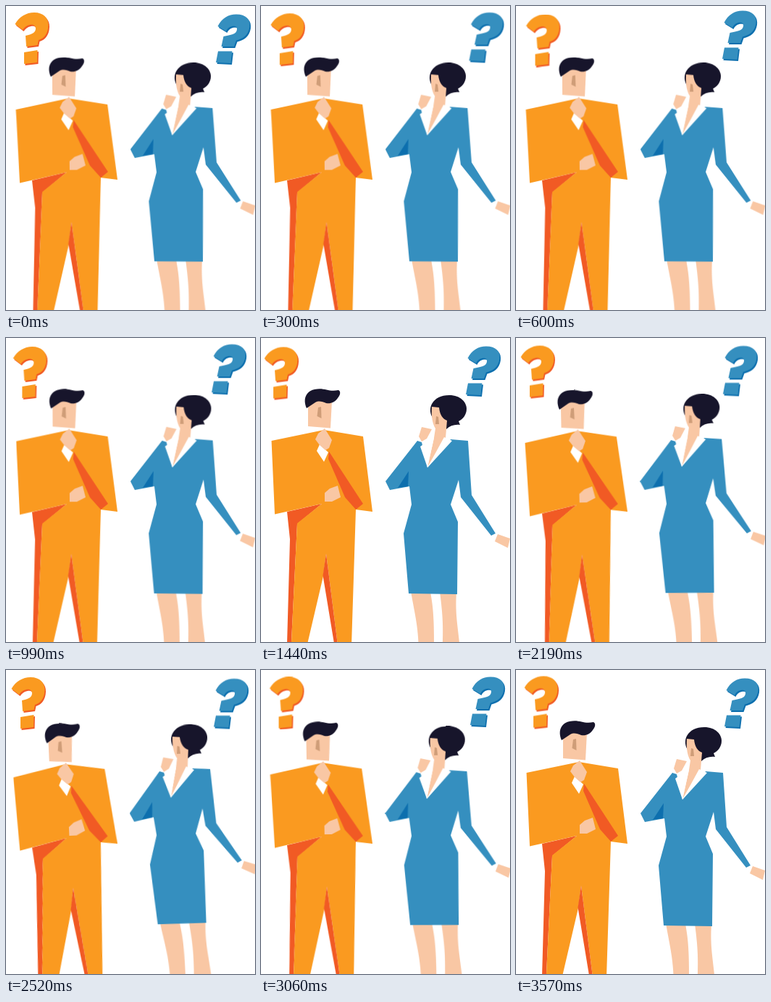
Animation of 344x420 px, one loop 3600 ms. Source, as an HTML page without scripts:

```html
<!DOCTYPE html>
<html lang="en">
<head>
<meta charset="utf-8">
<title>Two people wondering</title>
<style>
  html, body { margin: 0; width: 100%; height: 100%; overflow: hidden; background: #fff; }
  svg { display: block; width: 344px; height: 420px; }

  .orange { fill: #fa9a20; }
  .red { fill: #f15a24; }
  .blue { fill: #358fbf; }
  .navy { fill: #0d6fae; }
  .skin { fill: #f9c7a4; }
  .nose { fill: #cf9d78; }
  .hair { fill: #17152b; }
  .white { fill: #fff; }

  .person, .mark { animation: 3.6s ease-in-out infinite; }
  .person { animation-name: sway; }
  #man { transform-origin: 154px 240px; }
  #woman { transform-origin: 170px 227px; }
  .his { animation-name: drift-his; }
  .hers { animation-name: drift-hers; }

  @keyframes sway {
    0%, 16.67% { transform: rotate(-.45deg); }
    40%, 52.5% { transform: rotate(0deg); }
    70% { transform: rotate(-2.6deg); animation-timing-function: cubic-bezier(.42, 0, .45, 1); }
    99.17% { transform: rotate(0deg); }
    100% { transform: rotate(-.45deg); }
  }
  @keyframes drift-his {
    0%, 100% { transform: translate(0, 0); }
    16.67% { transform: translate(1.5px, 2.5px); }
    40% { transform: translate(-8px, 3.5px); }
    52.5% { transform: translate(-7px, 2px); }
    70% { transform: translate(-5px, 1px); }
    85% { transform: translate(-.5px, .5px); }
    99.17% { transform: translate(-1px, -.5px); }
  }
  @keyframes drift-hers {
    0%, 100% { transform: translate(0, 0); }
    16.67% { transform: translate(-5px, -5px); }
    40% { transform: translate(-7px, 0); }
    52.5% { transform: translate(-5px, -1.5px); }
    70% { transform: translate(-3px, .5px); }
    85% { transform: translate(-1px, -2px); }
    99.17% { transform: translate(-2px, 0); }
  }
</style>
</head>
<body>
<svg viewBox="0 0 344 420">
  <defs>
    <path id="his-mark" d="M12.500 25C18 15 28 9 39 9C52 9 59 17 58.500 27C58 39 52 45 45 47L43.500 54L28 56L27 41C36 39 41 37 41 31C41 27 37 25 33 26C28 27 25 30 23 33ZM25 64L43.500 61L43 78L25 80Z"/>
    <path id="her-mark" d="M292.500 28C298 17 307 11.500 318 11.500C332 11.500 338 19 336.500 29C335 40 327 45.500 318 47.500L315 56L297.500 56L300.500 42C311 40 318 39 319 33C320 28 316 27 312 28C308 29 305 32 304 35ZM293 62.500L312.500 62.500L310.500 79L290 78Z"/>
  </defs>

  <g class="mark his">
    <use href="#his-mark" class="red" x="1.5" y="2"/>
    <use href="#his-mark" class="orange"/>
  </g>
  <g class="mark hers">
    <use href="#her-mark" class="navy" x="1.5" y="2"/>
    <use href="#her-mark" class="blue"/>
  </g>

  <g id="man" class="person">
    <path class="red" d="M36 240L84 229L50 257L41 440H35.500L40 278Z"/>
    <path class="orange" d="M50 256L84 229L131 237L124.500 440H108L90 298L86 329L60 440H41Z"/>
    <path class="red" d="M90 298L108 440H104L85.500 328Z"/>
    <path class="orange" d="M14.500 142L87 127L141 136L154 240L131 237H84V229L19 243.500Z"/>
    <path class="red" d="M94 157L141 229L131 237L116 220L93 167Z"/>
    <path class="skin" d="M88 214L95 208L106 204L110 220L98 226H88Z"/>
    <path class="skin" d="M65 88L78 84L98 86L96 124.500L65 122Z"/>
    <path class="nose" d="M79 96L83 95L83.500 111L77.500 108Z"/>
    <path class="hair" d="M63 97C57 84 63 73 74 71C88 68 93 75 107 72C111 74 109 80 106 83C102 89 96 91 90 90C85 88 80 86 75 89Z"/>
    <path class="white" d="M77 156L81 147L93 158L87 171Z"/>
    <path class="skin" d="M88 125L98 141L94 152L89 155L81 148L75 140L79 132Z"/>
  </g>

  <g id="woman" class="person">
    <path class="skin" d="M207 350H234C236 365 240 375 239 440H218C218 400 213 385 207 350Z"/>
    <path class="skin" d="M247 350H270C268 385 272 395 276 440H250C253 395 250 375 247 350Z"/>
    <path class="blue" d="M262 140L286 142L291 217L324 270L318 273L276 220L273 196L262 230L272 254L271 354L204 353L197 270L208 230L205 205L178 210L172 198L216 142L222 144L230 179Z"/>
    <path class="navy" d="M189 207L204 184L203 205Z"/>
    <path class="hair" d="M237 110C229 97 237 79 260 79C276 79 284 89 284 98C284 106 279 112 273 115L275 120C268 119 261 121 256 126Z"/>
    <path class="skin" d="M236 95L246 96C247 106 251 112 257 114L255 138L230 178L239 138L241 125C237 119 235 108 236 95Z"/>
    <path class="nose" d="M242 108L245 109L246 119L241 119Z"/>
    <path class="white" d="M220 150L235 139L239 138L230 179Z"/>
    <path class="white" d="M253 137L264 142L230 179Z"/>
    <path class="skin" d="M222 123L236 126L229 139L222 143L218 136Z"/>
    <path class="skin" d="M327 271L344 277L341 290L323 281Z"/>
  </g>
</svg>
</body>
</html>
```
